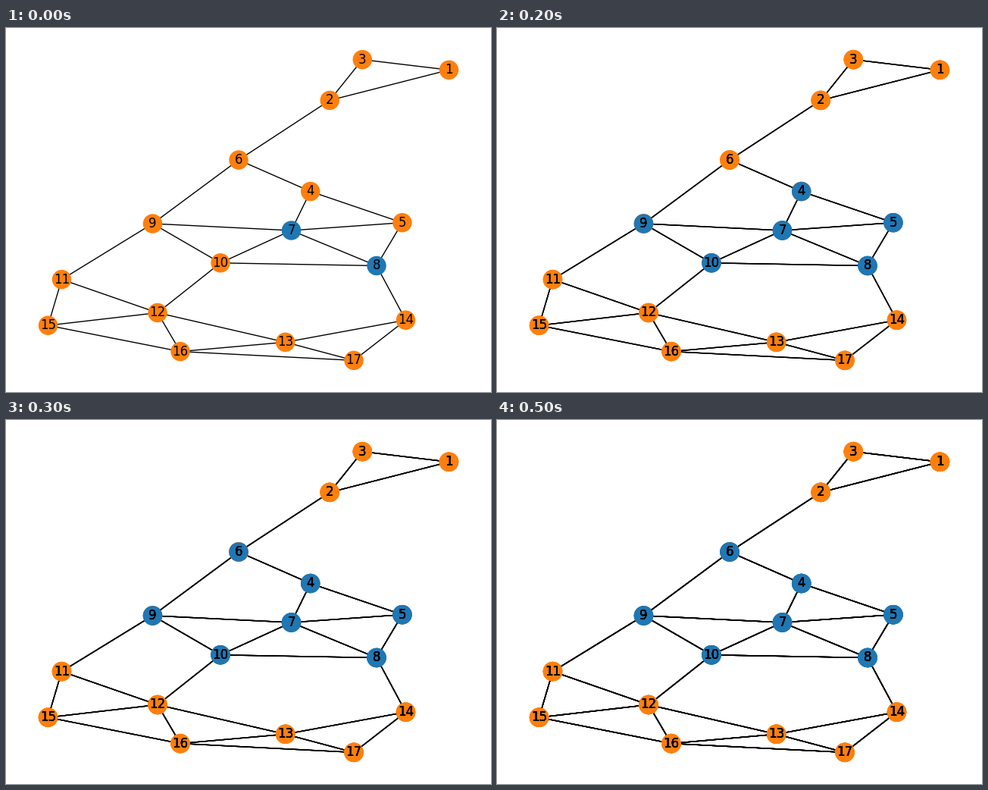
A matplotlib script for the animation above (600 ms loop, 640x480 px).

```python
from itertools import pairwise

import matplotlib.pyplot as plt
from matplotlib.animation import FuncAnimation
from matplotlib.collections import LineCollection

WIDTH, HEIGHT, DPI = 640, 480, 100
FRAMES, INTERVAL = 6, 100
THRESHOLD = 0.5
SEEDS = {7, 8}
ADOPTED, WAITING = "#1f77b4", "#ff7f0e"

# The outermost nodes keep a 5% margin, applied twice, on every side.
SPAN = 1 / 1.1 ** 2
LEFT, RIGHT = WIDTH * (1 - SPAN) / 2, WIDTH * (1 + SPAN) / 2
TOP, BOTTOM = HEIGHT * (1 - SPAN) / 2, HEIGHT * (1 + SPAN) / 2

POINTS = [
    (RIGHT, 55.3), (427.2, 95.4), (470.3, TOP), (401.7, 215.5), (522.9, 256.7),
    (307, 174), (376.5, 267), (489, 313.5), (193.5, 258), (283, 309.8),
    (73.5, 331.6), (200, 375.5), (368.7, 414.3), (527.5, 385.2),
    (LEFT, 392.2), (230, 426.6), (459, BOTTOM),
]
NODES = dict(enumerate(POINTS, start=1))

# Walks along the graph: first its rim, then the links inside.
WALKS = [
    "2 1 3 2 6 4 5 8 14 17 16 15 11 9 6",
    "4 7 9 10 7 8 10 12 13 14",
    "12 16 13 17",
    "11 12 15",
    "5 7",
]
EDGES = [edge for walk in WALKS for edge in pairwise(map(int, walk.split()))]
NEIGHBOURS = {n: [a + b - n for a, b in EDGES if n in (a, b)] for n in NODES}


def spread(adopted):
    """Add every node with enough adopting neighbours."""
    return adopted | {
        n for n, near in NEIGHBOURS.items()
        if sum(m in adopted for m in near) >= THRESHOLD * len(near)
    }


def draw_graph(adopted):
    lines = [(NODES[a], NODES[b]) for a, b in EDGES]
    ax.add_collection(LineCollection(lines, colors="black", linewidths=1, zorder=1))
    colors = [ADOPTED if n in adopted else WAITING for n in NODES]
    ax.scatter(*zip(*POINTS), s=300, c=colors, zorder=2)
    for n, (x, y) in NODES.items():
        ax.text(x, y, str(n), size=12, ha="center", va="center", zorder=3)


def update(frame):
    # Steps are painted over one another, so lines and labels grow heavier.
    ax.clear()
    ax.set(xlim=(0, WIDTH), ylim=(HEIGHT, 0))
    ax.axis("off")
    adopted = SEEDS
    for _ in range(frame + 1):
        draw_graph(adopted)
        adopted = spread(adopted)
    return []


plt.rcParams["font.family"] = "DejaVu Sans"
fig = plt.figure(figsize=(WIDTH / DPI, HEIGHT / DPI), dpi=DPI, facecolor="white")
ax = fig.add_axes((0, 0, 1, 1))
anim = FuncAnimation(fig, update, frames=FRAMES, interval=INTERVAL,
                     init_func=lambda: [], repeat=True)
plt.show()
```
